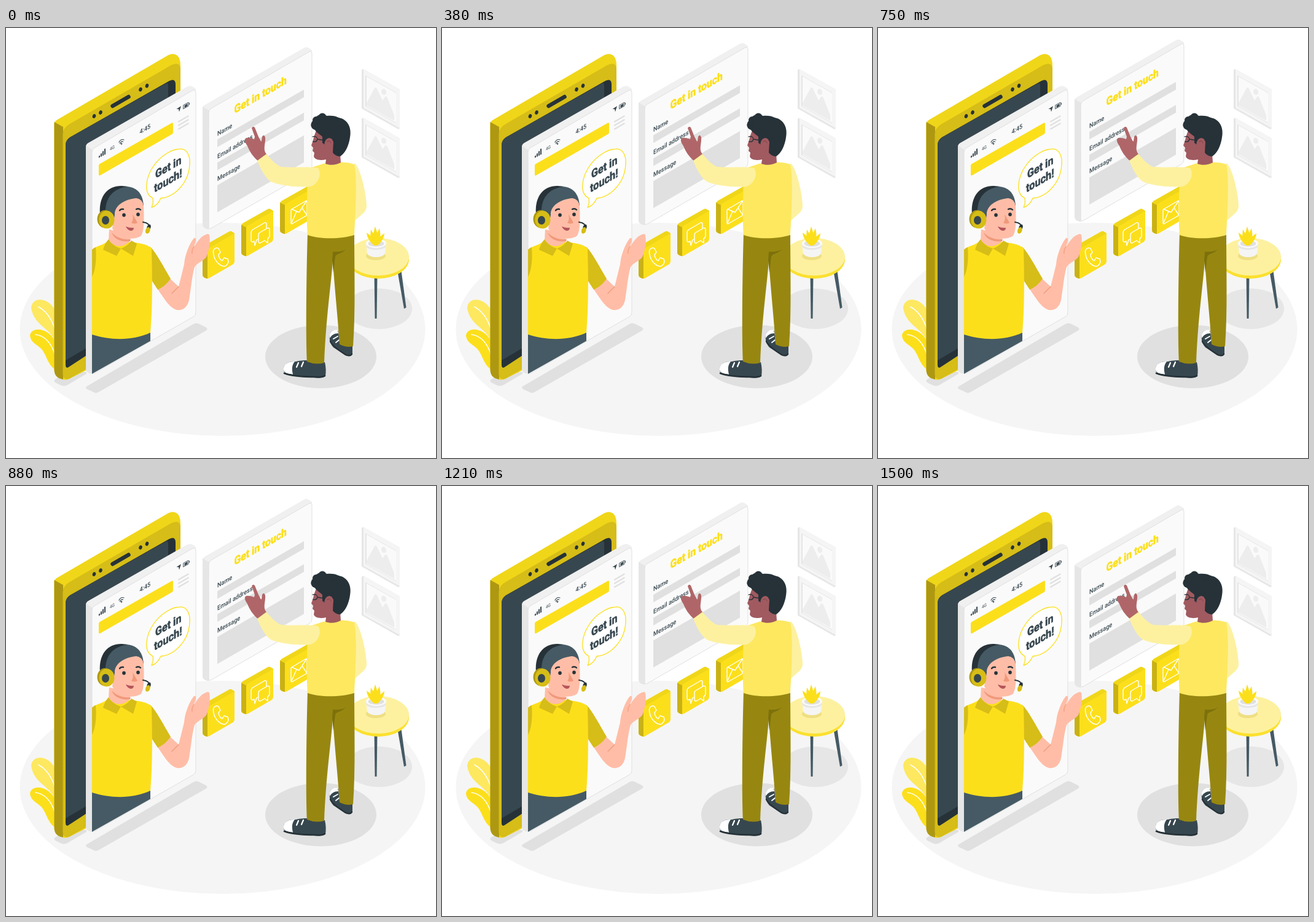
These frames come from a looping animation (700 px wide and 700 px high, 1540 ms). An HTML page with a canvas:

```html
<!DOCTYPE html>
<html lang="en">
<head>
<meta charset="utf-8">
<title>Get in touch</title>
<style>
html, body { margin: 0; width: 100%; height: 100%; overflow: hidden; background: #fff; }
canvas { display: block; }
</style>
</head>
<body>
<canvas id="stage" width="700" height="700"></canvas>
<script>
const ctx = document.getElementById('stage').getContext('2d');
const LOOP = 1541.67, STEP = LOOP / 37;
const C = {
  yellow: '#fcdf1b', top: '#f0d619', gold: '#d6bd17', olive: '#ae9812',
  ink: '#263238', slate: '#37474f', steel: '#455a64',
  paper: '#fafafa', light: '#f0f0f0', mid: '#e6e6e6', grey: '#e0e0e0',
  skin: '#ffbda7', blush: '#f0997a', hand: '#b06668', face: '#a05a60',
  shirt: '#fde860', sleeve: '#fdf1a0', trousers: '#978710', crease: '#7d700c'
};

function fill(color, d) {
  ctx.fillStyle = color;
  ctx.fill(new Path2D(d));
}
function line(color, width, d) {
  ctx.strokeStyle = color;
  ctx.lineWidth = width;
  ctx.lineCap = ctx.lineJoin = 'round';
  ctx.stroke(new Path2D(d));
}
function oval(color, x, y, rx, ry = rx, turn = 0) {
  ctx.fillStyle = color;
  ctx.beginPath();
  ctx.ellipse(x, y, rx, ry, turn, 0, Math.PI * 2);
  ctx.fill();
}
function shifted(x, y, draw) {
  ctx.save();
  ctx.translate(x, y);
  draw();
  ctx.restore();
}
// Text lying on the plane that rises 30 degrees to the right; bold text gets a slight extra weight.
function isoText(text, x, y, size, weight, color) {
  ctx.save();
  ctx.transform(0.866, -0.5, 0, 1, x, y);
  ctx.font = `${weight} ${size}px Roboto, sans-serif`;
  ctx.fillStyle = ctx.strokeStyle = color;
  ctx.fillText(text, 0, 0);
  if (weight >= 700) {
    ctx.lineWidth = 0.6;
    ctx.lineJoin = 'round';
    ctx.strokeText(text, 0, 0);
  }
  ctx.restore();
}
// Upright parallelogram on the same plane.
function isoBar(color, x, y, w, h) {
  const rise = w * 0.577;
  fill(color, `M${x},${y} l${w},${-rise} v${h} l${-w},${rise}Z`);
}

function floor() {
  oval('#f5f5f5', 352.5, 490.5, 330, 173.5);
  oval(C.grey, 512.5, 535, 90.5, 51.5);
  oval(C.mid, 607, 457, 54, 33);
  fill(C.grey, 'M80,572 L100,560 H131 V563 L102,580 Q95,585 88,581 L80,577 Q77,574 80,572Z');
  fill(C.grey, 'M132,583 L305,482 Q310,479 315,482 L325,487 Q330,490 325,493 L152,592 Q146,596 141,592 L132,588 Q128,585 132,583Z');
  fill(C.shirt, 'M41,456 C42,436 70,438 80,460 V512 C74,488 46,486 41,456Z');
  line('#fff', 1.5, 'M53,454 C66,461 74,474 79,488');
  fill(C.yellow, 'M39,501 C40,486 68,486 80,510 V556 C68,548 66,533 59,524 C52,515 41,514 39,501Z');
  line('#fff', 1.5, 'M48,499 C64,501 74,514 80,532');
}

function pictureFrame() {
  fill(C.mid, 'M579,68 L582,67 L641,100 V163 L639,165 L579,131Z');
  fill('#f5f5f5', 'M582,67 L641,100 V163 L582,130Z');
  fill(C.mid, 'M585,77 L635,105 V155 L585,127Z');
  fill(C.paper, 'M587,79 L635,106 V154 L587,127Z');
  fill('#ededed', 'M587,122 L600,98 Q602,95 604,99 L613,118 L617,112 Q619,110 621,114 L632,142 V151 L587,126Z');
  oval('#ededed', 615, 104, 4, 5, -0.3);
}

function phone() {
  fill(C.top, 'M78.5,156 Q78.5,152 84,149 L261,46 Q272,39 279,45 Q284,50 284,60 V300 L131,557 L103,571 Q95,575 88,570 Q78.5,565 78.5,556Z');
  fill(C.olive, 'M78.5,153 L93,161 V572 Q78.5,570 78.5,556Z');
  fill(C.gold, 'M92.5,172 Q93,162 104,156 L268,61 Q284,53 284,68 V300 L131,555 L103,571 Q92.5,574 92.5,563Z');
  fill(C.ink, 'M97,191 Q97,183 104,178 L266,86 Q276,81 276,92 V300 L131,533 L102,552 Q97,555 97,548Z');
  fill(C.slate, 'M97,191 Q97,183 104,178 L261,90 Q264,89 264,94 V300 L131,521 L97,541Z');
  line(C.ink, 6.5, 'M173.5,127 L199.5,112');
  for (const [x, y] of [[143.5, 143.5], [154, 137.5], [219, 100], [229.5, 94]])
    oval(C.ink, x, y, 2.7, 3.5, 0.3);
}

function screen() {
  fill(C.light, 'M130,194 Q130,189 134,187 L294,96 Q299,93 303,95 L309,99 V300 L140,563 Q130,562 130,555Z');
  fill(C.mid, 'M130,191 L140,198 V563 Q130,561 130,555Z');
  const front = 'M140,202 Q140,197 144,195 L303,102 Q309,99 309,106 V463 Q309,468 305,470 L144,562 Q140,564 140,560Z';
  fill(C.paper, front);
  line(C.grey, 1, front);

  for (let i = 0; i < 4; i++)
    isoBar(C.slate, 151 + i * 3, 208.5 - i * 3.8, 2, 3 + i * 2.2);
  isoText('4G', 169, 200, 7.4, 400, C.slate);
  line(C.slate, 1.2, 'M184,186 Q187,180 192,182 M185.5,188 Q188,183.5 190.5,185');
  oval(C.slate, 188, 188.5, 1.3);
  isoText('4:45', 217.5, 173, 10.4, 500, C.slate);
  fill(C.slate, 'M277.5,132 L285,127 L282,136.5 L281,132Z');
  line(C.slate, 0.9, 'M289,125.5 L297,121 V127 L289,131.5Z M298.5,122 V124.5');
  isoBar(C.slate, 290.5, 126, 5, 4);
  for (let i = 0; i < 3; i++) line(C.grey, 2.4, `M281,${152.5 + i * 6} l15.5,-9`);
  fill(C.yellow, 'M151,224 Q151,222 153,221 L270,154.5 Q272,153.5 272,156 V170 Q272,172 270,173 L153,240 Q151,241 151,238Z');

  const bubble = 'M283,197 C294,196 300,207 299,222 C298,240 290,256 275,268 C267,274 259,277 252,277 C249,284 244,290 237,292 C239,288 240,282 239,277 C231,273 228,266 229,255 C230,235 245,214 262,204 C270,199 277,197 283,197Z';
  fill('#fff', bubble);
  line(C.yellow, 1.3, bubble);
  isoText('Get in', 243, 245, 18.6, 700, C.slate);
  isoText('touch!', 241, 268, 18.8, 700, C.slate);
}

function form() {
  fill(C.light, 'M320,131 Q320,127 324,125 L484,33 Q488,30 492,32 L498,36 V150 L330,328 Q320,326 320,320Z');
  fill(C.mid, 'M320,128 L330,134 V328 Q320,326 320,320Z');
  const front = 'M330,138 Q330,133 334,131 L493,39 Q498,36 498,42 V227 Q498,231 494,234 L334,326 Q330,328 330,324Z';
  fill(C.paper, front);
  line(C.grey, 1, front);
  isoText('Get in touch', 371.5, 139.5, 18.2, 700, C.yellow);
  isoBar(C.grey, 344, 181.5, 141, 12.5);
  isoBar(C.grey, 344, 219, 141, 12.5);
  isoBar(C.grey, 344, 256, 141, 44);
  isoText('Name', 344, 176, 10.5, 500, C.slate);
  isoText('Email address', 344, 213, 10.5, 500, C.slate);
  isoText('Message', 344, 249.5, 10.5, 500, C.slate);
}

function tiles() {
  for (let i = 0; i < 3; i++) shifted(i * 63, i * -36.4, () => {
    fill(C.top, 'M320,359 Q320,356 323,354 L362,332 Q365,330 367,331 L372,334 V370 L328,408 Q320,407 320,402Z');
    fill('#c9b115', 'M320,357 L328,361 V408 Q320,406 320,402Z');
    fill(C.yellow, 'M328,364 Q328,360 331,358 L369,336 Q372,334 372,337 V379 Q372,383 369,385 L331,407 Q328,409 328,405Z');
  });
  line('#fff', 1.4, 'M340,359 C337,361 337,367 339,373 C342,382 350,388 356,388 C359,387 362,383 362,380 L361,376 L355,374 L352,379 C348,377 346,372 346,369 L349,365 L346,359 Q343,357 340,359Z');
  line('#fff', 1.4, 'M402,328 L421,317 Q424,316 424,319 V336 L408,345 L405,354 L404,347 L402,348 Q399,349 399,345 V333 Q399,330 402,328Z');
  const reply = 'M413,333 L426,325.5 Q429,325 429,328 V339 Q428,342 426,343 V350 L421,346 L414,350 Q411,351 411,347 V337 Q411,334 413,333Z';
  fill(C.yellow, reply);
  line('#fff', 1.4, reply);
  line('#fff', 1.4, 'M465,295 L488,281.5 Q490,280.5 490,283 V303 Q490,305 488,306 L466,318.5 Q464,319.5 464,317 V297 Q464,295.5 465,295 L477,300 L489,282 M464.5,318 L473,298.5 M489.5,304 L482,293');
}

function agent() {
  fill(C.steel, 'M140,498 C170,507 205,507 235,495 V509.5 L140,563Z');
  fill(C.skin, 'M246,424 L267,408 L281,421 L290,385 C291,370 298,352 306,342 Q310,341 309,347 L306,356 C311,349 316,341 322,338 Q330,333 331,337 C333,346 331,362 326,373 C320,380 312,382 307,389 C303,402 301,425 298,443 C295,456 287,460 278,459 C265,455 257,439 246,424Z');
  line(C.blush, 1.2, 'M281,421 L270,432 M306,356 Q302,361 303,367');
  fill(C.gold, 'M234,356 C242,361 256,388 268,408 Q260,420 247,426 L234,406Z');
  fill(C.yellow, 'M140,361 C148,354 158,354 167,346 L208,349 C222,351 232,353 237,359 C238,400 239,450 235,496 C205,510 168,508 140,499Z');
  fill(C.gold, 'M140,361 Q144,357 146,357 C148,378 145,396 140,405Z');
  fill(C.skin, 'M168,328 L167,345 C175,356 188,360 202,347 L201,335Z');
  fill(C.blush, 'M172,333 C180,341 190,345 203,344 L202,347 C188,349 176,344 172,333Z');
  fill(C.gold, 'M167,344 C162,349 160,355 158,361 L180,371 L187,359 C178,356 171,351 167,344Z M187,359 L207,371 L213,351 L204,346 C200,352 194,357 187,359Z');

  fill(C.steel, 'M163,318 C156,285 166,258 192,258 C211,257 223,268 224,289 L182,322Z');
  fill(C.skin, 'M177,304 C176,290 192,279 212,277 Q222,278 224,290 C225,310 225,331 220,338 C212,345 190,344 180,338 L173,326Z');
  fill(C.ink, 'M153,302 C151,274 165,257 188,257 L199,258 C174,261 161,276 162,302Z');
  oval(C.olive, 161, 311, 12.5, 14.5);
  oval(C.gold, 164, 312, 12.5, 14.5);
  oval(C.slate, 162, 313, 6, 7);
  line(C.ink, 2.4, 'M185,297 Q187,294 191,295 M212,295 Q216,293 219,296');
  oval(C.ink, 192, 304.5, 2.8, 3);
  oval(C.ink, 215, 303.5, 2.8, 3);
  fill(C.blush, 'M206,303 L214,317 Q209,320 204,317 Q208,313 206,303Z');
  fill('#b5555a', 'M195,323 Q202,326 208,325 C208,332 199,332 195,323Z');
  line(C.ink, 2, 'M223,316 C230,317 234,320 234,325');
  oval(C.ink, 232.5, 324.5, 3, 5, 0.35);
  oval(C.gold, 230.8, 329.5, 3.6, 5.5, 0.35);
}

function table() {
  fill(C.steel, 'M599.5,400 H604.5 L603.5,473 H600.5Z');
  fill(C.steel, 'M637,394 L643,392 L651.5,455 L648,457Z');
  oval('#fbe02e', 606, 376.5, 50, 31.5);
  oval(C.sleeve, 606, 372.5, 50, 30.5);
  oval('#efdf83', 602, 371, 16, 7);
  fill('#f5f5f5', 'M586,350 L588,367 C592,375 613,375 617,367 L619,350Z');
  fill(C.mid, 'M586,351 L587,357 C594,363 612,362 618,357 L619,351 C612,360 592,360 586,351Z');
  oval(C.paper, 602.5, 350.5, 16.5, 7.5);
  oval(C.grey, 602.5, 351, 13, 5);
  for (const [x, y] of [[587, 333], [594, 328], [601, 323], [608, 326], [616, 334]]) {
    const mid = (x + 602) / 2;
    fill(C.yellow, `M${x},${y} Q${mid - 7},344 599,354 H605 Q${mid + 7},344 ${x},${y}Z`);
  }
}

function visitor() {
  // shoes
  fill(C.slate, 'M543,512 Q553,520 564,517 L564,530 Q560,535 553,533 L533,520 C526,513 525,500 529,495 Q534,490 541,493Z');
  fill('#fff', 'M527,505 C525,496 532,490 540,492 L541,497 C534,497 530,500 527,505Z');
  line('#fff', 2, 'M533,506 L540,502 M537,512 L542,508');
  line(C.ink, 2.4, 'M528,510 Q530,517 553,532 Q560,535 563,531');
  fill(C.slate, 'M452,553 C455,543 465,543 472,543 C480,541 488,541 491,541 Q504,549 519,544 C521,552 521,560 520,567 Q514,571 500,569 C480,568 454,567 452,558Z');
  fill('#fff', 'M452,557 C451,546 460,543 470,543 C464,550 466,558 467,564 C460,563 453,562 452,557Z');
  line('#fff', 2.2, 'M476,545 L473,552 M484,544 L481,551');
  line(C.ink, 2.6, 'M453,562 C466,567 488,568 505,568 Q515,569 519,566');

  // trousers
  fill(C.trousers, 'M491,333 H567 C567,400 569,460 565,518 Q555,521 543,515 C541,480 535,425 532,378 C529,420 521,470 518,545 Q504,549 490,543 C488,500 489,400 491,333Z');
  fill(C.crease, 'M531,378 L532,364 C540,365 548,364 554,360 C546,368 538,367 536,372 L533,398Z');

  // raised hand, arms and top
  fill(C.hand, 'M411,217 C402,210 396,200 393,192 C389,186 387,181 391,179 C396,178 401,180 404,181 L405,177 L400,163 Q402,159 405,162 L411,177 C414,182 415,186 416,184 L417,177 Q420,172 422,178 C423,188 417,199 425,206Z');
  fill(C.sleeve, 'M567,220 C576,225 586,265 587,288 C588,300 578,303 566,316Z');
  fill(C.shirt, 'M516,221 C530,218 555,217 567,222 C572,245 569,300 567,337 C545,344 510,344 491,337 C489,310 490,270 491,248 L498,227Z');
  fill(C.sleeve, 'M424,205 C432,215 440,223 448,226 C470,228 490,225 508,228 C515,238 508,254 496,258 C470,260 444,256 431,250 C421,243 414,228 409,216Z');

  // head
  fill(C.face, 'M507,164 C501,173 501,182 497,191 L500,195 L499,200 L502,203 L501,209 C503,215 512,216 521,214 L520,221 C528,224 538,223 545,219 L544,204 L532,162Z');
  fill(C.ink, 'M503,166 C494,163 496,153 500,151 C505,141 515,138 522,143 C529,142 537,143 542,146 C557,149 563,163 560,178 C558,192 552,204 544,209 Q537,209 532,203 L533,185 L527,180 L519,190 L515,187 V177 C510,172 506,171 503,166Z');
  oval(C.ink, 502, 158, 5.5);
  oval(C.ink, 505, 150, 6);
  oval(C.ink, 515, 145, 6.5);
  oval(C.face, 525.5, 188, 7, 9, 0.25);
  line('#874a50', 1.2, 'M523,185 Q527,182 529,187');
  line(C.ink, 1.3, 'M499,177 Q506,175 507,181 Q506,186 500,185 M507,181 L518,183');
}

// Linear bobbing: up for 720 ms, then down a little past the start.
function bob(t) {
  if (t < 720) return -13 * t / 720;
  if (t < 1490) return -13 + 13.5 * (t - 720) / 770;
  return 0.5 * (LOOP - t) / (LOOP - 1490);
}

function draw(now) {
  const t = Math.floor(((now + 4) % LOOP) / STEP) * STEP;
  ctx.fillStyle = '#fff';
  ctx.fillRect(0, 0, 700, 700);
  floor();
  pictureFrame();
  shifted(0, 79.5, pictureFrame);
  phone();
  screen();
  shifted(0, bob(t), form);
  tiles();
  agent();
  table();
  visitor();
}

const start = performance.now();
function tick() {
  draw(performance.now() - start);
  requestAnimationFrame(tick);
}
tick();
</script>
</body>
</html>
```
